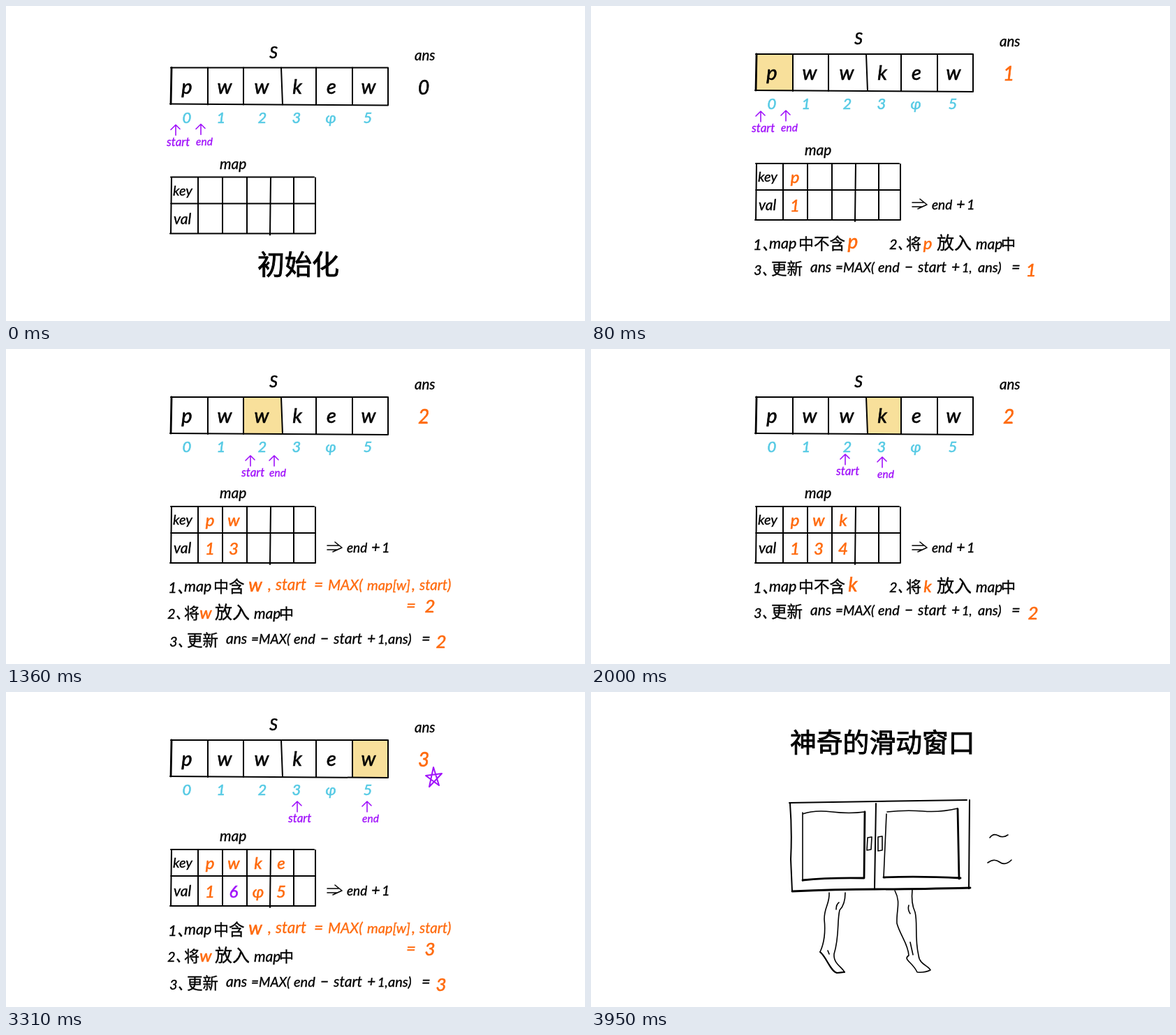
An HTML page for the animation above (4460 ms loop, 829x452 px).

```html
<!DOCTYPE html>
<html lang="zh">
<head>
<meta charset="utf-8">
<title>Sliding window</title>
<style>
  html, body { margin: 0; width: 100%; height: 100%; overflow: hidden; background: #fff; }
  #strip { display: block; width: 6632px; height: 452px; animation: scenes 4460ms step-end infinite; }
  text {
    font-family: Lato, "Noto Sans CJK SC", "Noto Sans CJK", sans-serif; font-style: italic;
    fill: currentColor; stroke: currentColor; stroke-width: .35;
  }
  path { fill: none; stroke: currentColor; stroke-width: 2; stroke-linecap: round; stroke-linejoin: round; }
  .mid { text-anchor: middle; }
  .han { font-style: normal; }
  .title { font-style: normal; stroke-width: .9; }
  .heavy { stroke-width: .6; }
  .orange { color: #ff6a0d; }
  .blue { color: #56cae4; }
  .violet { color: #a012fa; }
  .thin { stroke-width: 1.6; }
  .thick { stroke-width: 2.8; }
  @keyframes scenes {
    0% { transform: translateX(0); }
    1.7937% { transform: translateX(-829px); }
    16.1435% { transform: translateX(-1658px); }
    30.4933% { transform: translateX(-2487px); }
    44.843% { transform: translateX(-3316px); }
    59.1928% { transform: translateX(-4145px); }
    74.2152% { transform: translateX(-4974px); }
    88.565%, 100% { transform: translateX(-5803px); }
  }
</style>
</head>
<body>
<svg id="strip" viewBox="0 0 6632 452"></svg>
<script>
const text = (x, y, size, str, cls = '') =>
  `<text x="${x}" y="${y}" font-size="${size}" class="${cls}">${str}</text>`;
const path = (d, cls = '') => `<path d="${d}" class="${cls}"/>`;
const shift = (x, y, body) => `<g transform="translate(${x} ${y})">${body}</g>`;
// Words on one baseline, each as [x, size, string]
const words = (y, list, cls) => list.map(([x, size, str]) => text(x, y, size, str, cls)).join('');

const edges = [236, 289, 340, 395, 444, 496, 547];
const letterX = [259, 313, 366, 417, 466, 519];
const indexX = [259, 308, 367, 416, 465, 518];
const mapX = [292, 326, 361, 394];

function pointer(word, [x, tip]) {
  const isStart = word === 'start';
  return path(`M${x} ${tip + 15}V${tip}M${x - 7} ${tip + 7}L${x} ${tip}L${x + 6} ${tip + 6}`, 'violet thin')
    + text(x - (isStart ? 13 : 7), tip + 30, isStart ? 17 : 15.5, word, 'violet');
}

function arrayTable(current) {
  const fill = current === undefined ? '' :
    `<rect x="${edges[current]}" y="69" width="${edges[current + 1] - edges[current]}" height="53" fill="#f8e09b"/>`;
  const letters = [...'pwwkew'].map((c, i) => text(letterX[i], 106, 29, c, 'mid heavy')).join('');
  const indices = [...'0123φ5'].map((c, i) => text(indexX[i], 148, 22, c, 'mid blue heavy')).join('');
  return fill + letters + indices + text(383, 55, 23, 'S', 'mid heavy')
    + path('M236 69H547V123L235 121')
    + path('M237 69L236 121', 'thick')
    + path('M289 69V122M340 69V122M394 69L396 122M444 69V122M496 69V122');
}

function mapTable(keys, values) {
  const keyCells = [...keys].map((c, i) => text(mapX[i], 254, 24, c, 'mid orange heavy')).join('');
  const valueCells = [...values].map((c, i) =>
    text(mapX[i], 295, 24, c, 'mid heavy ' + (c === '6' ? 'violet' : 'orange'))).join('');
  return text(306, 214, 21, 'map') + text(239, 252, 20, 'key') + text(240, 293, 21, 'val')
    + path('M236 226H441M236 264H442M235 307H443M237 226L236 307M275 226V307M310 226V307M345 226V307M379 226L378 309M412 226V307M443 227V307')
    + keyCells + valueCells;
}

function board({ current, ans, start, end, keys = '', values = '' }) {
  const color = current === undefined ? '' : ' orange';
  return arrayTable(current) + mapTable(keys, values)
    + text(585, 58, 20.5, 'ans') + text(598, 107, 28, ans, 'mid heavy' + color)
    + pointer('start', start) + pointer('end', end);
}

const rule = path('M460 282H476M460 288H475M471 277L481 285L468 291', 'thin')
  + words(292, [[488, 19, 'end'], [523, 22, '+'], [538, 20, '1']]);

const putNote = letter => text(427, 349, 20, '2、') + text(451, 349, 22, '将', 'han')
  + text(482, 349, 24, letter, 'mid orange heavy') + text(495, 349, 25, '放入', 'han')
  + text(551, 349, 21, 'map') + text(587, 349, 21, '中', 'han');

const updateNote = (ans, equalsX, ansX) => text(233, 386, 20, '3、') + text(258, 385, 22.5, '更新', 'han')
  + words(382, [[314, 21, 'ans'], [350, 19, '=MAX('], [411, 20, 'end'], [449, 21, '−'],
    [468, 21, 'start'], [516, 21, '+'], [531, 18, '1,'], [equalsX - 48, 20, 'ans)'], [equalsX, 22, '=']])
  + text(ansX, 388, 26, ans, 'mid orange heavy');

const opening = text(232, 350, 22, '1、') + text(255, 348, 21.5, 'map') + text(297, 349, 22, '中', 'han');

const newLetter = (letter, ans, ansX) => rule + opening + text(319, 349, 22.5, '不含', 'han')
  + text(375, 348, 28, letter, 'mid orange heavy') + putNote(letter) + updateNote(ans, 602, ansX);

const seenLetter = (letter, ans) => rule + opening + text(319, 349, 22.5, '含', 'han')
  + text(357, 348, 27, letter, 'mid orange heavy')
  + words(346, [[375, 22, ','], [386, 22.5, 'start'], [441, 23, '='], [461, 21, 'MAX('],
    [517, 20, 'map[w]'], [581, 22, ','], [592, 20.5, 'start)']], 'orange')
  + text(573, 376, 24, '=', 'orange') + text(607, 378, 26, ans, 'mid orange heavy')
  + shift(-196, 38, putNote(letter)) + shift(1, 41, updateNote(ans, 594, 622));

const star = path('M606 136L612 108L620 134L601 120L624 117Z', 'violet');

const walkingWindow = text(285, 86, 37.8, '神奇的滑动窗口', 'title')
  + path('M284 159Q350 158 408 157T538 155M542 155L541 282M285 160Q288 200 286 240L288 286M408 160L406 282')
  + path('M288 286Q350 283 408 283T543 281', 'thick')
  + path('M303 175Q320 169 345 172T392 172M303 173V271M424 172Q450 169 475 171T525 167M423 175L419 266', 'thin')
  + path('M392 172L391 267Q340 266 303 270M525 168L527 268M419 266Q470 264 529 267', 'thick')
  + path('M396 209L402 208L401 226L395 227ZM411 208L417 207V227L411 228Z', 'thin')
  + path('M571 209Q576 202 583 206T597 205M568 245Q577 238 585 244T602 241', 'thin')
  + path('M341 288C342 304 334 308 334 326C336 345 334 360 328 373C337 380 343 401 352 403L363 402C359 394 347 390 348 376C356 350 352 330 356 313Q364 305 364 288M355 302Q351 305 351 312M339 371L341 376', 'thin')
  + path('M328 373C337 380 343 401 352 403L363 402')
  + path('M435 285C444 302 437 312 438 332C443 350 454 361 455 378C446 384 460 387 467 402Q478 403 486 399C484 393 470 391 469 378C463 352 468 332 464 316Q458 303 460 284M455 306Q453 312 457 318M457 359L461 377', 'thin');

const scenes = [
  shift(0, 19.5, board({ ans: '0', start: [243, 151], end: [279, 150] }))
    + text(360, 385, 39, '初始化', 'title'),
  board({ current: 0, ans: '1', start: [243, 151], end: [279, 150], keys: 'p', values: '1' })
    + newLetter('p', '1', 630),
  board({ current: 1, ans: '2', start: [256, 152], end: [308, 152], keys: 'pw', values: '12' })
    + newLetter('w', '2', 633),
  board({ current: 2, ans: '2', start: [350, 153], end: [384, 153], keys: 'pw', values: '13' })
    + seenLetter('w', '2'),
  board({ current: 3, ans: '2', start: [364, 151], end: [417, 155], keys: 'pwk', values: '134' })
    + newLetter('k', '2', 633),
  board({ current: 4, ans: '3', start: [364, 151], end: [466, 155], keys: 'pwke', values: '1345' })
    + newLetter('e', '3', 626),
  board({ current: 5, ans: '3', start: [417, 157], end: [517, 157], keys: 'pwke', values: '16φ5' })
    + seenLetter('w', '3') + star,
  walkingWindow
];

document.getElementById('strip').innerHTML = scenes.map((scene, i) => shift(i * 829, 0, scene)).join('');
</script>
</body>
</html>
```
